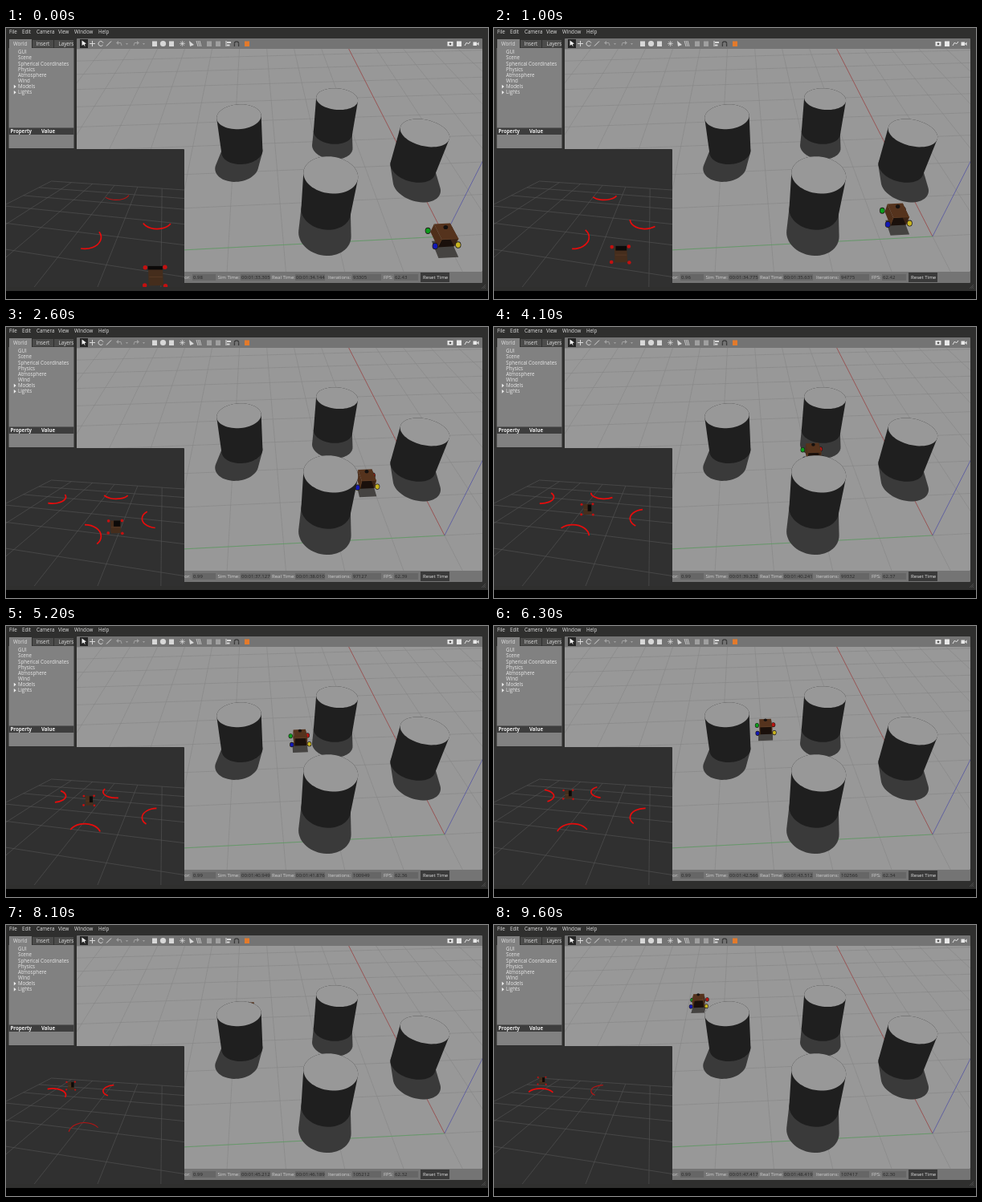
Animation, 600 px wide and 338 px high, one loop 9700 ms. Source, as an HTML page with a canvas:

```html
<!DOCTYPE html>
<html lang="en">
<head>
<meta charset="utf-8">
<title>Robot simulation</title>
<style>
  html, body { margin: 0; width: 100%; height: 100%; overflow: hidden; background: #000; }
  canvas { display: block; width: 600px; height: 338px; }
</style>
</head>
<body>
<canvas id="stage" width="600" height="338"></canvas>
<script>
const ctx = document.getElementById('stage').getContext('2d');
const LOOP = 9700, STEP = 100, RANGE = 3.93;
const GROUND = '#989898', WINDOW = '#2f2f2e', PANEL = '#818181', BAR = '#747474';

// Simulator camera: tilted down, above a ground plane with 1 m cells
const F = 437, CX = 340, CY = 165, HEIGHT = 5.35, SIN = 0.656, COS = 0.755;
function project(x, y, z = 0) {
  const side = 3.075 - 0.062 * x - 0.998 * y, ahead = 3.995 + 0.998 * x - 0.062 * y;
  const depth = ahead * COS + (HEIGHT - z) * SIN, down = (HEIGHT - z) * COS - ahead * SIN;
  return [CX + F * side / depth, CY + F * down / depth, depth];
}
function unproject(u, v, z) {
  const a = (v - CY) / F, depth = (HEIGHT - z) / (SIN + COS * a);
  const side = depth * (u - CX) / F - 3.075, ahead = depth * (COS - SIN * a) - 3.995;
  return [0.998 * ahead - 0.062 * side, -0.998 * side - 0.062 * ahead];
}
function sensorPoint(x, y) {
  const w = 1 + 0.264 * x + 0.06 * y;
  return [(51.5 * x - 60.5 * y + 193) / w, 120 + 186 / w];
}

// Robot way points on the screen: time, x, y
const path = [
  [0, 545, 259], [1000, 501, 233], [2600, 448, 190], [4100, 397, 156],
  [6300, 338, 126], [8100, 302, 106], [9600, 255, 95]
];
// Pillars, far to near: centre of the top, centre of the scan
const pillars = [
  [412, 88, 137, 207], [521, 130, 188, 239], [290, 110, 58, 212], [404, 182, 98, 261]
].map(([u, v, sx, sy]) => ({ at: unproject(u, v, 1), sx, sy }));

function robotAt(t) {
  let i = 0;
  while (i < path.length - 2 && t >= path[i + 1][0]) i++;
  const a = path[i], b = path[i + 1], before = path[i - 1] || a, after = path[i + 2] || b;
  const span = b[0] - a[0], s = (t - a[0]) / span;
  const [u, v] = [1, 2].map(k => {
    const m0 = (b[k] - before[k]) / (b[0] - before[0]) * span;
    const m1 = (after[k] - a[k]) / (after[0] - a[0]) * span;
    const d = b[k] - a[k];
    return a[k] + s * (m0 + s * (3 * d - 2 * m0 - m1 + s * (m0 + m1 - 2 * d)));
  });
  return unproject(u, v, 0.15);
}

function rect(x, y, w, h, color) {
  ctx.fillStyle = color;
  ctx.fillRect(x, y, w, h);
}
function poly(points, color) {
  ctx.beginPath();
  points.forEach(p => ctx.lineTo(p[0], p[1]));
  ctx.closePath();
  ctx.fillStyle = color;
  ctx.fill();
}
function line(points, color, width = 0.6) {
  ctx.beginPath();
  points.forEach(p => ctx.lineTo(p[0], p[1]));
  ctx.strokeStyle = color;
  ctx.lineWidth = width;
  ctx.stroke();
}
function arc(x, y, r, from, to, color, width = 1, ry = r) {
  ctx.beginPath();
  ctx.ellipse(x, y, r, ry, 0, from, to);
  ctx.strokeStyle = color;
  ctx.lineWidth = width;
  ctx.stroke();
}
function dot(x, y, rx, color, ry = rx) {
  ctx.beginPath();
  ctx.ellipse(x, y, rx, ry, 0, 0, 7);
  ctx.fillStyle = color;
  ctx.fill();
}
function text(s, x, y, color = '#dedede', size = 6.2, weight = 400) {
  ctx.font = `${weight} ${size}px "Open Sans", sans-serif`;
  ctx.fillStyle = color;
  ctx.fillText(s, x, y);
}
function clipped(x, y, w, h, draw) {
  ctx.save();
  ctx.beginPath();
  ctx.roundRect(x, y, w, h, 1);
  ctx.clip();
  draw();
  ctx.restore();
}
function hull(points) {
  const half = list => list.reduce((out, p) => {
    while (out.length > 1) {
      const [a, b] = out.slice(-2);
      if ((b[0] - a[0]) * (p[1] - a[1]) > (b[1] - a[1]) * (p[0] - a[0])) break;
      out.pop();
    }
    return [...out, p];
  }, []);
  const sorted = points.slice().sort((a, b) => a[0] - b[0] || a[1] - b[1]);
  return [...half(sorted), ...half(sorted.reverse())];
}

function disc([x, y], z) {
  return Array.from({ length: 64 }, (_, i) => {
    const a = i * Math.PI / 32;
    return project(x + 0.49 * Math.cos(a), y + 0.49 * Math.sin(a), z);
  });
}
// The sun throws shadows along (-0.556, 0.111) per metre of height
for (const p of pillars) {
  const [x, y] = p.at;
  p.cap = disc(p.at, 1);
  p.body = hull([...p.cap, ...disc(p.at, 0.01)]);
  p.shadow = hull([...disc(p.at, 0), ...disc([x - 0.556, y + 0.111], 0)]);
}
function drawPillar({ body, cap }) {
  poly(body, '#1f1f1f');
  poly(cap, GROUND);
}

function robot(x, y) {
  const at = (dx, dy, z) => project(x + dx, y + dy, z);
  const face = (corners, color) => poly(corners.map(c => at(...c)), color);
  const wheel = (dx, dy, color) => {
    const [px, py, depth] = at(dx, dy, 0.09);
    dot(px, py, 23 / depth, '#201c18', 27 / depth);
    dot(px, py, 18 / depth, color, 21 / depth);
  };
  const L = 0.17, W = 0.15, lo = 0.05, hi = 0.28;
  face([[-0.36, 0.2, 0], [-0.36, -0.16, 0], [0, -0.18, 0], [0, 0.18, 0]], '#454341');
  wheel(0.17, 0.21, '#0c9c1c');
  wheel(0.17, -0.21, '#b81512');
  face([[-L, W, lo], [-L, -W, lo], [-L, -W, hi], [-L, W, hi]], '#1a100b');
  face([[-L, W, lo], [L, W, lo], [L, W, hi], [-L, W, hi]], '#4f2f1a');
  face([[-L, -W, lo], [L, -W, lo], [L, -W, hi], [-L, -W, hi]], '#3b2416');
  face([[-L, W, hi], [-L, -W, hi], [L, -W, hi], [L, W, hi]], '#55331d');
  line([at(-L, W, lo), at(-L, W, hi), at(-L, -W, hi), at(-L, -W, lo)], '#5f3a20', 0.8);
  const [lx, ly, depth] = at(0.05, 0, 0.33);
  dot(lx, ly, 18 / depth, '#15110f', 16 / depth);
  wheel(-0.17, 0.21, '#1218b4');
  wheel(-0.17, -0.21, '#c8b420');
}

function simulator(x, y) {
  rect(88, 26, 505, 278, GROUND);
  for (let i = -10; i <= 10; i++) {
    line([project(-3, i), project(14, i)], '#858585');
    if (i > -4) line([project(i, -8), project(i, 11)], '#858585');
  }
  const origin = project(0, 0);
  line([origin, project(14, 0)], '#a04040', 0.7);
  line([origin, project(0, 9)], '#58a05c', 0.7);
  line([origin, [600, 153]], '#4a4aa4', 0.7);
  pillars.forEach(p => poly(p.shadow, '#3a3a3a'));
  pillars.slice(0, 2).forEach(drawPillar);
  robot(x, y);
  pillars.slice(2).forEach(drawPillar);
}

function sensorView(x, y) {
  rect(0, 151, 222, 172, '#303030');
  for (let i = -5; i <= 5; i++) {
    line([sensorPoint(-1, i), sensorPoint(5, i)], '#565656');
    if (i >= -1) line([sensorPoint(i, -5), sensorPoint(i, 5)], '#565656');
  }
  const [u, v] = sensorPoint(x, y);
  for (const { at, sx, sy } of pillars) {
    const distance = Math.hypot(at[0] - x, at[1] - y);
    if (distance > RANGE) continue;
    const rx = sy * 0.078, ry = (sy - 150) * 0.13;
    const facing = Math.atan2((v - sy) / ry, (u - sx) / rx), far = distance > 3.4;
    arc(sx, sy, rx, facing - 1.15, facing + 1.15, far ? '#b41414' : '#e60c0c', far ? 1.1 : 1.7, ry);
  }

  const s = (v - 120) * 0.065, corner = (dx, dy) => [u + dx * s, v + dy * s];
  const wheels = [[-1, -0.85], [1, -0.9], [-1.05, 0.95], [1.05, 1]];
  wheels.forEach(([dx, dy]) => dot(...corner(dx, dy), s * 0.22, '#c41010'));
  poly([corner(-0.7, -0.9), corner(0.75, -0.9), corner(0.85, 0.95), corner(-0.65, 1)], '#452d1c');
  line([corner(-0.6, 0.1), corner(0.75, 0.1)], '#60402a');
  // The dark front panel turns to the right as the robot drives away
  const turn = Math.min(1, x / 2.4);
  const [px, py] = corner(-0.7 + 0.8 * turn, -1 + 0.2 * turn);
  rect(px, py, s * (1.45 - 0.8 * turn), s * (0.4 + 0.8 * turn), '#0c0a09');
}

function toolbar() {
  const ink = '#d8d8d8', dim = '#a0a0a0', dark = '#3a3a3a', y = 19.5;
  const box = (x, color) => rect(x - 3, y - 3, 6, 6.5, color);
  clipped(88, 13, 505, 16, () => rect(88, 13, 505, 16, BAR));
  rect(92, 14, 10, 11, '#262626');
  poly([[94.5, 15.5], [94.5, 22], [96.5, 20.5], [98.5, 23.5], [98, 20], [100, 19.6]], '#eee');
  line([[104, y], [111, y]], ink, 1);
  line([[107.5, 16], [107.5, 23]], ink, 1);
  arc(118, y, 3, 0.6, 6, ink);
  line([[125, 22.5], [131, 16.5]], ink, 1);
  for (const [x, d] of [[141, -1], [162, 1]]) {
    line([[x - 3 * d, 22], [x - 2 * d, 18.5], [x + 3 * d, 18.5]], dim, 1);
    poly([[x + 4 * d, 18.5], [x + d, 16], [x + d, 21]], dim);
    poly([[x + 8, 19], [x + 11, 19], [x + 9.5, 21]], dim);
  }
  box(185, ink);
  dot(195.5, y, 3.6, ink);
  box(206, ink);
  for (let i = 0; i < 4; i++) {
    const c = Math.cos(i * Math.PI / 4) * 3.4, s = Math.sin(i * Math.PI / 4) * 3.4;
    line([[219.5 - c, y - s], [219.5 + c, y + s]], ink, 0.7);
    if (i) line([[235 + i * 2, 16], [237 + i * 2, 23]], ink, 0.8);
  }
  poly([[228, 16], [234, 21], [229, 23]], ink);
  box(253, dim);
  box(264, dim);
  line([[274, 16], [274, 23]], ink, 1);
  line([[275, 18], [280, 18]], ink, 2);
  line([[275, 21.5], [278.5, 21.5]], ink, 2);
  arc(287, 19.5, 2.6, Math.PI, 0, dark, 1.3);
  line([[284.4, 19.5], [284.4, 23]], dark, 1.3);
  line([[289.6, 19.5], [289.6, 23]], dark, 1.3);
  box(300, '#e37a2b');
  rect(549.5, 17, 7, 5.5, '#e8e8e8');
  dot(553, 19.8, 1.4, '#555');
  box(564, '#e8e8e8');
  line([[571, 22], [573.5, 18], [575.5, 20], [578, 17]], '#e8e8e8', 1);
  rect(581.5, 17.5, 4.5, 4.5, '#e8e8e8');
  poly([[586, 19.7], [588.5, 17.5], [588.5, 22]], '#e8e8e8');
}

function windowFrame() {
  rect(0, 0, 600, 328, WINDOW);
  rect(0, 328, 600, 10, '#000');
  Object.entries({ File: 4, Edit: 20, Camera: 38, View: 65, Window: 85, Help: 115 })
    .forEach(([s, x]) => text(s, x, 7.4));
  rect(4, 14, 28, 12, PANEL);
  rect(33, 15, 26, 9.5, '#4c4c4b');
  rect(60, 15, 24, 9.5, '#4c4c4b');
  text('World', 9, 21.6);
  text('Insert', 37.5, 21.6);
  clipped(60, 14, 24, 11, () => text('Layers', 65.5, 21.6));
  rect(3.5, 25, 81, 125, PANEL);
  ['GUI', 'Scene', 'Spherical Coordinates', 'Physics', 'Atmosphere', 'Wind', 'Models', 'Lights']
    .forEach((s, i) => {
      const y = 32.3 + i * 7.17;
      text(s, 15, y, '#e8e8e8');
      if (i > 5) poly([[9.8, y - 4.6], [12.6, y - 2.2], [9.8, y + 0.2]], '#eee');
    });
  rect(3.5, 124.5, 81, 8.5, '#3d3d3d');
  text('Property', 5.5, 131, '#f0f0f0', 6.1, 700);
  text('Value', 44, 131, '#f0f0f0', 6.1, 700);
  toolbar();
}

function stamp(ms) {
  const minutes = Math.floor(ms / 60000), seconds = (ms % 60000 / 1000).toFixed(3);
  return `00:${String(minutes).padStart(2, '0')}:${seconds.padStart(6, '0')}`;
}
function statusBar(t) {
  const sim = Math.round(93305 + t * 1.47), real = Math.round(sim + 839 + t * 0.017);
  const field = (label, x, value, vx, width) => {
    rect(vx - 1, 307, width, 8, '#666');
    text(label, x, 313, '#d4d4d4', 6);
    text(value, vx, 313, '#262626', 6);
  };
  clipped(88, 300, 505, 18, () => rect(88, 304, 505, 14, BAR));
  field('or:', 222, t < 500 ? '0.98' : t < 1500 ? '0.96' : '0.99', 233, 29);
  field('Sim Time:', 263.5, stamp(sim), 293, 37);
  field('Real Time:', 331, stamp(real), 361, 37);
  field('Iterations:', 401, String(sim), 432, 36);
  field('FPS:', 470, (62.43 - t * 1.4e-5).toFixed(2), 484, 30);
  rect(516, 305, 36, 12, '#3a3a3a');
  text('Reset Time', 519, 313.2, '#e4e4e4', 6.1);
  for (let i = 0; i < 3; i++) line([[592 + i * 2, 325], [597, 320 + i * 2]], '#666', 0.5);
}

function render(now) {
  const t = Math.floor(now % LOOP / STEP) * STEP;
  const [x, y] = robotAt(t);
  windowFrame();
  clipped(88, 26, 505, 278, () => simulator(x, y));
  statusBar(t);
  clipped(0, 151, 222, 172, () => sensorView(x, y));
}

const start = performance.now();
function tick() {
  render(performance.now() - start);
  requestAnimationFrame(tick);
}
tick();
</script>
</body>
</html>
```
